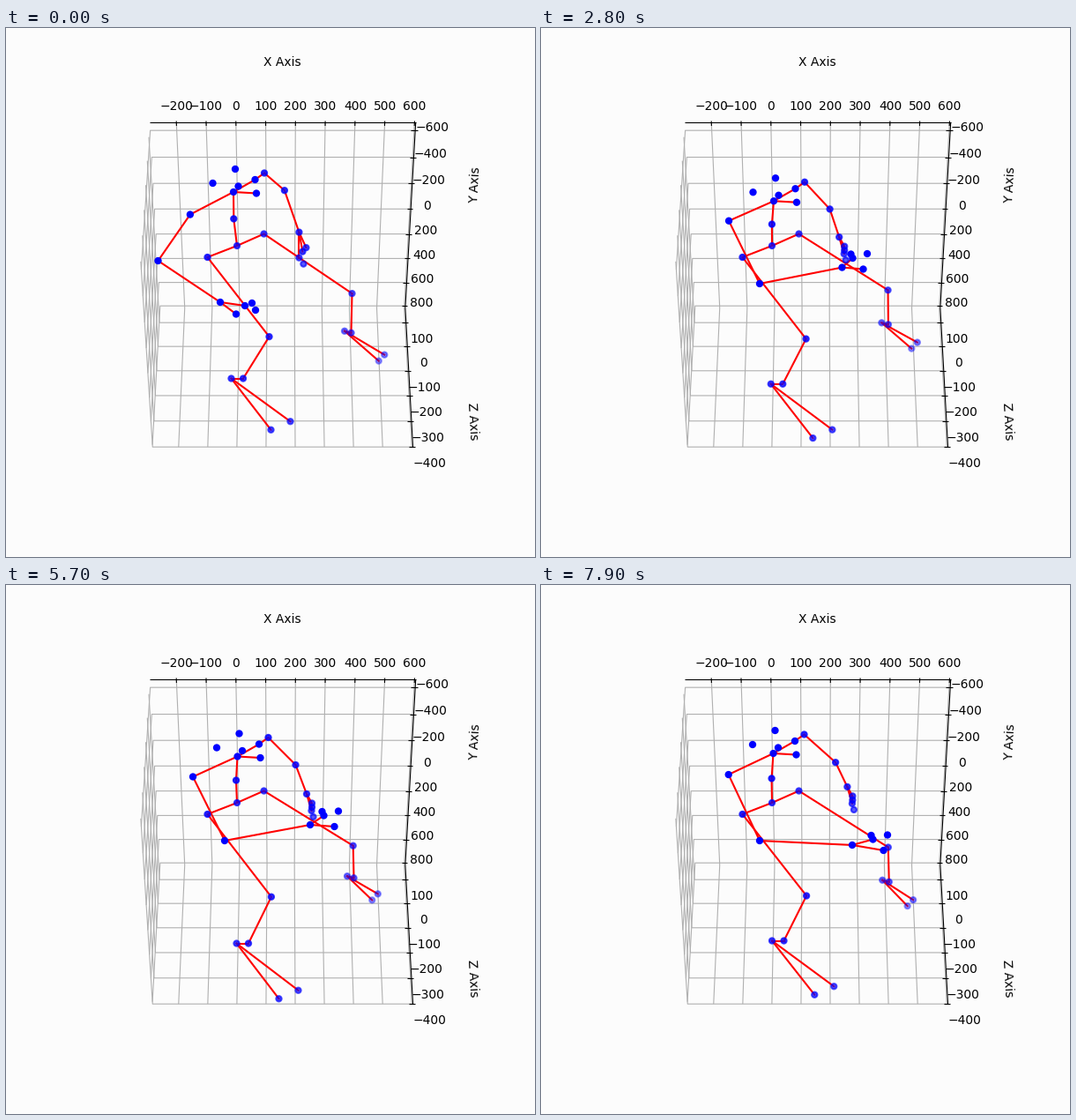
These frames come from a looping animation (600x600 px, 8 s). A matplotlib script:

```python
import numpy as np
import matplotlib.pyplot as plt
from matplotlib.animation import FuncAnimation
from matplotlib.collections import LineCollection

FRAMES, STEP = 80, 100
HX, HY, HZ = 0.5975, 0.5952, 0.4464    # half sizes of the box
CENTER = np.array([313.9, 293.2])
SCALE, DIST, S45 = 2497, 10, np.sqrt(0.5)
PAD, DROP = 1.1328, 6.4                # tick label offsets
TICK_IN, TICK_OUT = 0.019, 0.0095


def project(x, y, z):
    """Perspective view from 45 degrees below, in stage pixels."""
    depth = DIST + S45 * (y + z)
    return CENTER + SCALE / depth * np.array([x, S45 * (y - z)])


def ease(u):
    u = np.clip(u, 0, 1)
    return u * u * (3 - 2 * u)


# Rest pose
HEAD = np.array([(264.5, 168.5), (239, 184.5), (268, 188), (288.5, 196), (287, 180.5)])
PELVIS, NAVEL, CHEST = np.array([(262, 247), (261, 221.5), (262.5, 194.5)])
SHOULDER_R, SHOULDER_L = np.array([(297.5, 173), (212, 217.5)])
LEG_L = np.array([(228.5, 260), (300.5, 353.5), (274, 406),
                  (260.5, 406), (308, 468.5), (330, 459)])
LEG_R = np.array([(292.5, 233.5), (393.5, 296), (394, 333),
                  (386.5, 331), (421, 351.5), (414.5, 358.5)])
KICK = np.array([(0, 0), (-1, -7), (-37, -9), (-39, -6), (-62, 4), (-64, 4)])
LEG_WEIGHT = np.array([0, 0.4, 1, 1, 1.5, 1.5])[:, None]

# Both ends of the arm swing; fingers are relative to the wrist
ELBOW_L = np.array([(172.5, 283.5), (248, 290)])
WRIST_L = np.array([(249, 324), (345, 272)])
FINGERS_L = np.array([[(28, 4), (18, 13.5), (36, 1), (40, 9)],
                      [(15.5, -10.5), (27.5, 2), (13.5, -15), (32, -15.5)]])
ELBOW_R = np.array([(319.5, 191), (328.5, 204)])
WRIST_R = np.array([(336, 248.5), (341, 237)])
FINGERS_R = np.array([[(4, 22), (8, 17.5), (0, 29), (5, 36)],
                      [(6, 15), (6, 10.5), (5.5, 19), (7.5, 26)]])

# step, torso sway x y, foot shift x y, toe stretch, hand reach x y
KEYS = np.array([
    (0, -4.5, -8.5, -5, -8.5, 12, -6, -13),
    (11, 0, -2, 0, 2, 16, -8, -8),
    (19, 3, 3.5, 0.5, -4.5, 12, -9, -4),
    (37, 0, 0, 0, 0, 0, -5, 3),
    (44, -0.5, 2.5, -1, 1.5, 18, 0, 0),
    (57, 0, 0, 1, 0.5, 0, 0, 0),
    (66, 0, -1, 3, 1, 15, 13, 23),
    (79, 1, -3.5, 1.5, -2.5, 0, 16, 27),
])


def controls(i):
    k = min(np.searchsorted(KEYS[:, 0], i, side="right"), len(KEYS) - 1)
    a, b = KEYS[k - 1], KEYS[k]
    row = a + (b - a) * ease((i - a[0]) / (b[0] - a[0]))
    return row[1:3], row[3:5], row[5], row[6:8]


def swing_at(i):
    """0 with the left arm out, 1 with it across the body."""
    return (ease((i - 22) / 5) - ease((i - 38) / 5) + ease((i - 50) / 4)
            - ease((i - 67) / 3) + ease((i - 73) / 4))


def pose_at(i):
    sway, shift, stretch, reach = controls(i)
    s = swing_at(i)
    early = np.minimum(reach, 0)

    def mix(ends, out=0, across=0):
        return (ends[0] + out) * (1 - s) + (ends[1] + across) * s

    elbow_r = mix(ELBOW_R, 0, reach * (0.3, 0)) + 0.8 * sway
    wrist_r = mix(WRIST_R, early * (0.6, 1.3), reach * (0.4, -0.3))
    elbow_l = mix(ELBOW_L, early * (0, 1.5))
    wrist_l = mix(WRIST_L, early, reach * (0.5, 0.85))
    fingers_l = wrist_l + mix(FINGERS_L, 0, reach * (0.5, 0.15))

    toes = np.zeros((6, 2))
    toes[4:, 0] = stretch
    leg_l = LEG_L + LEG_WEIGHT * shift
    leg_r = (LEG_R + LEG_WEIGHT * shift * (0.5, -1.5) + toes
             + KICK * np.exp(-((i - 19) / 4) ** 2))
    return np.vstack([
        HEAD + sway, PELVIS, NAVEL + 0.6 * sway, CHEST + sway,
        SHOULDER_R + sway, elbow_r, wrist_r, wrist_r + mix(FINGERS_R),
        SHOULDER_L + 0.7 * sway, elbow_l, wrist_l, fingers_l,
        leg_l, leg_r])


# Joint numbers: head 0-4, spine 5-7, arms 8-14 and 15-21, legs 22-27 and 28-33
CHAINS = [
    (5, 6, 7, 3), (7, 4, 8, 9, 10, 11), (10, 12), (10, 13),
    (7, 15, 16, 17, 18), (17, 19),
    (5, 22, 23, 24, 25, 26), (25, 27),
    (5, 28, 29, 30, 31, 32), (31, 33),
]
EDGES = [pair for c in CHAINS for pair in zip(c, c[1:])]
# Farther joints are fainter
ALPHA = np.concatenate([
    np.ones(5), np.linspace(0.72, 0.95, 3), np.linspace(0.8, 0.65, 7),
    np.ones(7), np.linspace(0.8, 0.65, 6), np.linspace(0.7, 0.4, 6)])

fig = plt.figure(figsize=(6, 6), dpi=100, facecolor="#fcfcfc")
ax = fig.add_axes([0, 0, 1, 1])
ax.set(xlim=(0, 600), ylim=(600, 0))
ax.axis("off")

grid, black = [], []


def label(pos, value):
    text = str(value).replace("-", "\u2212")
    ax.text(pos[0], pos[1] + DROP, text, ha="center", va="center", fontsize=10)


def title(x, y, text, start, end):
    """Axis title turned along the line from start to end."""
    dx, dy = project(*end) - project(*start)
    ax.text(x, y, text, rotation=np.degrees(np.arctan2(-dy, dx)),
            ha="center", va="center", fontsize=10)


for v in range(-200, 601, 100):
    x = -0.2105 + 0.001338 * v
    grid.append([project(x, -HY, HZ), project(x, HY, HZ), project(x, HY, -HZ)])
    black.append([project(x, -HY - TICK_OUT, HZ), project(x, -HY + TICK_IN, HZ)])
    label(project(x, -HY * PAD, HZ * PAD), v)
for v in range(-600, 801, 200):
    y = -0.0651 + 0.0008063 * v
    grid.append([project(HX, y, HZ), project(-HX, y, HZ), project(-HX, y, -HZ)])
    black.append([project(HX - TICK_IN, y, HZ), project(HX + TICK_OUT, y, HZ)])
    label(project(HX * PAD, y, HZ * PAD), v)
for v in range(-400, 101, 100):
    z = 0.1888 + 0.001588 * v
    grid.append([project(HX, HY, z), project(-HX, HY, z), project(-HX, -HY, z)])
    black.append([project(HX - TICK_IN, HY, z), project(HX + TICK_OUT, HY, z)])
    label(project(HX * PAD, HY * PAD, z), v)

CORNERS = [(-HX, -HY, HZ), (HX, -HY, HZ), (HX, HY, HZ), (HX, HY, -HZ)]
black += [[project(*a), project(*b)] for a, b in zip(CORNERS, CORNERS[1:])]
ax.add_collection(LineCollection(grid, colors="#b0b0b0", linewidths=0.8, zorder=1))
ax.add_collection(LineCollection(black, colors="black", linewidths=0.8, zorder=2))

title(313.5, 39, "X Axis", CORNERS[0], CORNERS[1])
title(532, 178.5, "Y Axis", CORNERS[2], CORNERS[1])
title(529.5, 446.5, "Z Axis", CORNERS[2], CORNERS[3])

first = pose_at(0)
bones = LineCollection([first[list(e)] for e in EDGES], colors="red",
                       linewidths=1.5, capstyle="projecting", zorder=3)
ax.add_collection(bones)
dots = ax.scatter(first[:, 0], first[:, 1], s=20, linewidths=1.5, zorder=4,
                  c=[(0, 0, 1, a) for a in ALPHA])


def update(i):
    pts = pose_at(i)
    bones.set_segments([pts[list(e)] for e in EDGES])
    dots.set_offsets(pts)
    return bones, dots


anim = FuncAnimation(fig, update, frames=FRAMES, interval=STEP,
                     repeat=True, repeat_delay=0)
plt.show()
```
